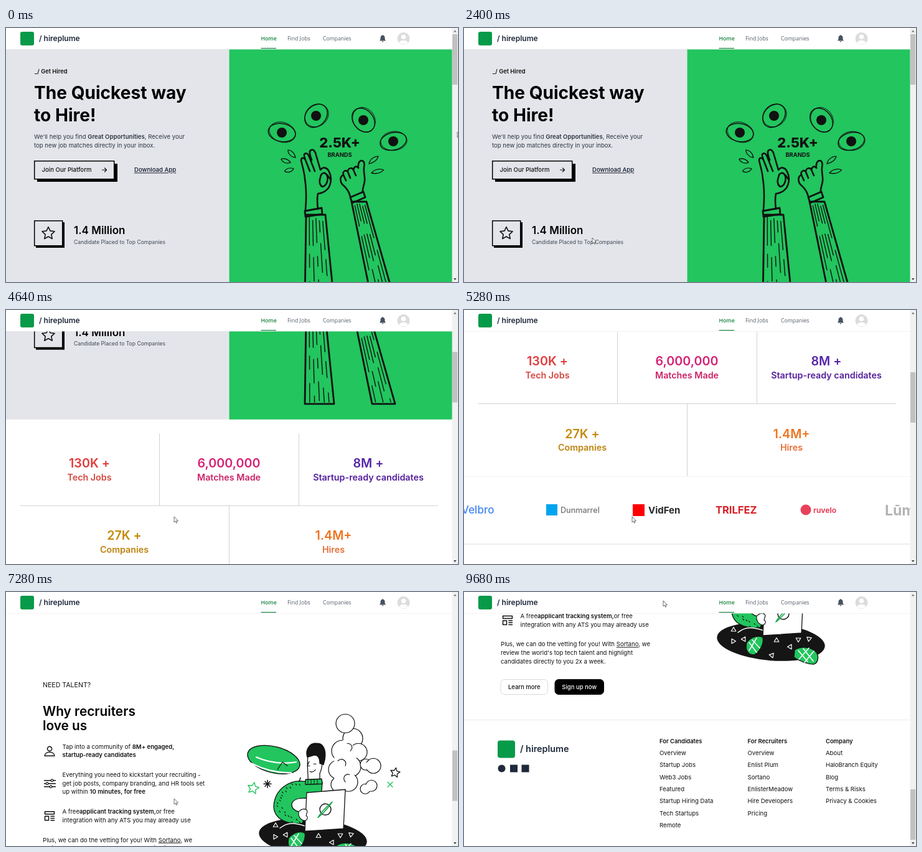
Write an HTML page that moves like this. It is 726x408 px and loops after 9.76 s.

```html
<!DOCTYPE html>
<html lang="en">
<head>
<meta charset="utf-8">
<title>hireplume</title>
<style>
html, body { margin: 0; width: 100%; height: 100%; overflow: hidden; background: #fff; }
svg { display: block; width: 726px; height: 408px; }
text { font-family: Inter, sans-serif; }
</style>
</head>
<body>
<svg id="stage" viewBox="0 0 726 408" xmlns="http://www.w3.org/2000/svg"></svg>
<script>
const LOOP = 9760, STEP = 80, GREEN = '#22c55e', BRAND = '#079a49', INK = '#111';

// ---------- drawing helpers ----------
// *bold* and _underlined_ runs are marked inside the string
const rich = s => s
  .replace(/\*(.+?)\*/g, '<tspan font-weight="600">$1</tspan>')
  .replace(/_(.+?)_/g, '<tspan text-decoration="underline">$1</tspan>');
const text = (x, y, size, s, fill = '#111', weight = 400, more = '') =>
  `<text x="${x}" y="${y}" font-size="${size}" fill="${fill}" font-weight="${weight}" ${more}>${rich(s)}</text>`;
const mid = (x, y, size, s, fill, weight) => text(x, y, size, s, fill, weight, 'text-anchor="middle"');
const lines = (x, y, list, fill) => list.map((s, i) => text(x, y + 3.4 + i * 13.6, 9.6, s, fill)).join('');
const rect = (x, y, w, h, fill, more = '') => `<rect x="${x}" y="${y}" width="${w}" height="${h}" fill="${fill}" ${more}/>`;
const circle = (x, y, r, fill, more = '') => `<circle cx="${x}" cy="${y}" r="${r}" fill="${fill}" ${more}/>`;
const oval = (x, y, rx, ry, a, fill, more = '') =>
  `<ellipse cx="${x}" cy="${y}" rx="${rx}" ry="${ry}" fill="${fill}" transform="rotate(${a} ${x} ${y})" ${more}/>`;
const line = (d, w = 1.2, color = INK, fill = 'none') =>
  `<path d="${d}" fill="${fill}" stroke="${color}" stroke-width="${w}" stroke-linecap="round" stroke-linejoin="round"/>`;
const shape = (d, fill, w = 1.3) => line(d, w, INK, fill);
const group = (y, s) => `<g transform="translate(0 ${y})">${s}</g>`;
const each = (list, fn) => list.map(fn).join('');

let seed = 7;
const rnd = () => (seed = (seed * 16807) % 2147483647) / 2147483647;

function star(x, y, R, w = 1.4, color = INK, turn = 0) {
  let d = '';
  for (let i = 0; i < 10; i++) {
    const a = (i * 36 - 90 + turn) * Math.PI / 180, r = i % 2 ? R * 0.48 : R;
    d += (i ? 'L' : 'M') + (x + r * Math.cos(a)).toFixed(1) + ' ' + (y + r * Math.sin(a)).toFixed(1);
  }
  return line(d + 'Z', w, color);
}
const cross = (x, y, r = 2, color = INK, w = 1) =>
  line(`M${x - r} ${y - r}l${2 * r} ${2 * r}M${x + r} ${y - r}l${-2 * r} ${2 * r}`, w, color);

// ---------- hero ----------
const bubble = (x, y, rx, ry, a) =>
  oval(x, y, rx, ry, a, 'none', 'stroke="#111" stroke-width="1.5"') +
  oval(x + 1, y - 0.6, rx - 0.4, ry + 1.3, a + 9, 'none', 'stroke="#111" stroke-width="0.9"') +
  circle(x, y, 8, INK);

const drop = (x, y, len, a) =>
  `<g transform="translate(${x} ${y}) rotate(${a})">${line(`M0 0C${len * .3} -5 ${len * .8} -4 ${len} 0C${len * .7} 4 ${len * .3} 3 0 0`, 1.3)}</g>`;

// a sleeve from (ax..bx, top) down to (cx..dx, bottom) with broken hatching
function sleeve(ax, bx, top, cx, dx, bottom) {
  const at = (u, v) => `${(ax + (bx - ax) * u + (cx - ax + (dx - cx - bx + ax) * u) * v).toFixed(1)} ${(top + (bottom - top) * v).toFixed(1)}`;
  let hatch = '';
  for (let k = 1; k < 6; k++) {
    for (let v = rnd() * 0.06 + 0.02; v < 0.95;) {
      const end = Math.min(0.98, v + 0.1 + rnd() * 0.25);
      hatch += `M${at(k / 6, v)}L${at(k / 6, end)}`;
      v = end + 0.06 + rnd() * 0.14;
    }
  }
  return line(`M${at(0, 0)}L${at(0, 1)}L${at(1, 1)}L${at(1, 0)}Z`, 2.8) + line(hatch, 1.4);
}

const hands =
  line('M481 292C483 270 482 255 480 242C479 230 476 222 474 213C474 207 479 208 481 212L488 230' +
    'M485 222C481 212 478 206 479 203C482 199 486 203 487 207L496 230' +
    'M491 212C488 204 486 198 490 196C494 194 497 199 498 204L505 228' +
    'C509 222 516 224 519 231C524 240 522 252 517 258C512 264 504 266 501 266C499 275 500 283 501 291' +
    'M505 240C506 232 513 230 516 238C518 246 514 254 508 255C503 252 503 245 505 240M516 236L521 243', 2.6) +
  line('M480 294L507 289L508 299L481 303Z', 2.8) + sleeve(482, 513, 300, 480, 527, 440) +
  line('M553 271C551 262 547 257 541 252C536 247 536 238 542 236C540 230 546 227 549 231C549 225 556 223 558 228' +
    'C559 222 564 221 566 225C565 219 567 213 571 213C576 213 576 219 575 224C574 232 577 238 576 246C575 254 572 258 573 264' +
    'M542 236L546 245M549 231L553 241M558 228L562 237', 2.6) +
  line('M553 272L574 263L577 272L556 281Z', 2.8) + sleeve(555, 579, 279, 588, 625, 440);

const hero =
  rect(0, 34, 358.5, 431, '#e4e5ea') + rect(358.5, 34, 358.5, 431, GREEN) +
  text(46, 73.4, 9.3, '_/ Get Hired'.replace('_', '&#95;'), INK, 600) +
  text(45, 114, 28.1, 'The Quickest way', '#000', 700) + text(45, 150, 28.1, 'to Hire!', '#000', 700) +
  lines(45, 174.6, ["We'll help you find *Great Opportunities*, Receive your", 'top new job matches directly in your inbox.'], '#2b3443') +
  rect(50, 218, 129, 29, '#000') + rect(45.7, 213.7, 128, 29, '#e4e5ea', 'stroke="#000" stroke-width="1.5"') +
  text(57.5, 231.4, 9.6, 'Join Our Platform', INK, 500) + line('M154.5 228H161.5M158.5 225L161.5 228L158.5 231', 1.2) +
  text(206, 231.4, 9.6, 'Download App', '#0f172a', 500, 'text-decoration="underline"') +
  rect(48, 312, 46, 41, '#000') + rect(45.7, 309.7, 45, 40, '#e4e5ea', 'stroke="#000" stroke-width="1.5"') + star(68, 330, 10.5, 1.6) +
  text(109, 331.3, 17, '1.4 Million', '#000', 600) +
  text(109, 346.6, 8.57, 'Candidate Placed to Top Companies', '#3d4654') +
  bubble(443, 168, 22, 14.5, 10) + bubble(498, 141, 20.5, 16, -48) + bubble(574, 148, 21, 16, 50) + bubble(622, 182, 21.5, 14, -14) +
  mid(536, 192, 22, '2.5K+', INK, 800) + mid(536, 206.8, 9.3, 'BRANDS', INK, 700) +
  drop(465, 208, 17, -135) + drop(457, 216, 16, -160) + drop(462, 226, 15, 165) +
  drop(583, 218, 19, -38) + drop(587, 233, 20, -14) + hands;

// ---------- figures and partner strip ----------
const stat = (x, y, num, label, color, tint) => mid(x, y, 19.7, num, color, 600) + mid(x, y + 20.8, 14.3, label, tint, 600);
const stats =
  stat(134, 542, '130K +', 'Tech Jobs', '#e23c3c', '#d5473f') +
  stat(358, 542, '6,000,000', 'Matches Made', '#d61f74', '#cb2268') +
  stat(582, 542, '8M +', 'Startup-ready candidates', '#5424a8', '#541f9b') +
  stat(190, 658.5, '27K +', 'Companies', '#c38a0a', '#bd840f') +
  stat(526, 658.5, '1.4M+', 'Hires', '#ee7420', '#e56e35') +
  line('M246.5 488V603M470.5 488V603M23 603.5H694M358.5 603V720', 1, '#d2d2d4') +
  line('M0 720.5H717', 1, '#f3f3f4') + line('M0 829H717', 1, '#dcdcde');

const partners = [
  text(0, 780, 17, 'Velbro', '#4285f4', 500),
  rect(0, 765, 18, 18, '#00a4ef') + text(23, 779, 12.6, 'Dunmarrel', '#737373', 500),
  rect(3, 765, 19, 19, '#f00') + text(28, 780, 15, 'VidFen', '#282828', 700),
  text(0, 780, 16.5, 'TRILFEZ', '#d81f26', 700),
  circle(9, 774, 8.5, '#e8425a') + text(21, 778.5, 12, 'ruvelo', '#e8425a', 700),
  text(0, 783, 23, 'Lūmera', '#b3b3b5', 700)
];
const strip = each(partners, s => `<g class="partner">${s}</g>`);

// ---------- job seeker section ----------
const fingers = (x, y, a) => {
  const d = 'M-3 9L-5 -3M-1 7L-2 -7M1.5 7L1.5 -7M3.5 8L5 -4M0 13L0 5';
  return `<g transform="translate(${x} ${y}) rotate(${a})">${line(d, 4.4)}${line(d, 2.2, '#fff')}</g>`;
};

const dancers =
  fingers(120, 113, 18) + fingers(159, 100, -4) + fingers(204, 114, -4) + fingers(271, 116, 4) +
  shape('M128 237C118 249 96 249 75 247L68 272C95 282 130 281 148 262C156 285 152 305 151 326L172 331C178 300 180 262 165 231Z', '#151515') +
  line('M160 240C170 265 169 295 166 322M120 256C108 261 95 261 84 259', 0.8, '#ddd') +
  shape('M74 250C66 246 58 250 55 262C52 275 54 282 60 283C66 276 72 270 71 262Z', GREEN) +
  shape('M152 328C158 332 165 331 171 332C178 336 181 340 179 344C170 346 158 342 153 338Z', GREEN) +
  line('M62 254L66 262M58 262L64 268M158 333L162 339M164 333L168 340', 0.8) +
  shape('M148 112L165 110C166 140 163 170 161 190L165 231L127 237C125 222 124 208 124 200C104 190 92 175 92 158C93 142 101 129 108 120L122 127C115 138 111 150 113 158C116 168 124 172 134 172C142 155 146 130 148 112Z', 'url(#shirt)') +
  line('M148 118L165 116M106 124L119 131M97 150L101 153M99 170L104 169M112 185L115 181M156 132L158 136M153 155L156 152M152 180L155 184M129 205L132 208M151 205L154 202M155 222L158 219', 1) +
  shape('M133 178L140 180L146 212L135 233L130 226C136 208 135 195 133 178Z', GREEN) +
  oval(126, 156, 11.5, 15, -10, '#fff', 'stroke="#111" stroke-width="1.3"') +
  shape('M113 151C111 140 117 136 123 138C128 133 135 136 134 142C127 146 121 145 117 147Z', '#151515') +
  shape('M117 160C121 163 124 156 129 157C133 158 136 157 138 155C141 167 137 176 129 176C122 175 117 168 117 160Z', '#151515') +
  oval(126, 163, 4, 2, -10, '#fff') + line('M119 151c2 -2 4 -2 5 0M128 150c2 -2 4 -2 5 0M126 151l2 5', 1) +
  shape('M214 230L252 234C258 265 258 300 257 336L234 337L236 270L224 335L202 332C204 300 206 260 214 230Z', 'url(#pants)') +
  line('M215 228L252 232M214 234L252 238M221 246L218 251M211 266L212 270M225 275L223 280M212 295L214 299M208 318L211 320M244 254L246 258M249 280L247 284M242 300L245 303M250 318L248 322', 1) +
  oval(206, 341, 15, 6.5, -8, '#151515') + oval(238, 345, 15, 8, -20, '#151515') +
  shape('M193 125L209 122C208 145 212 162 222 172L250 172C262 165 268 145 265 125L280 123C286 145 287 165 281 178C275 190 265 197 262 203L263 236L247 236L246 231L211 232L214 195C200 188 190 170 191 150Z', '#151515') +
  shape('M226 171L243 171L247 231L224 228Z', '#fff') + shape('M233 174L238 174L243 212L238 222L232 212Z', '#151515') +
  line('M196 132L209 129M265 132L280 130M276 145C279 160 276 172 268 181', 0.8, '#ddd') +
  oval(237, 155, 10.5, 15, -3, '#fff', 'stroke="#111" stroke-width="1.3"') +
  shape('M225 146C223 137 230 134 236 136C245 133 252 140 250 152C252 158 250 164 246 164L244 150C239 146 232 146 225 146Z', '#151515') +
  line('M231 152h3M239 152h3M236 153l-2 6l3 0M234 164c3 1 6 0 7 -3', 1) +
  line('M170 87L173 92M185 73L183 94M204 91L197 99M127 284C134 282 138 278 139 274M83 165C86 177 92 182 94 183M285 188C282 194 279 196 277 197M196 270C193 278 193 286 195 291', 1) +
  line('M70 158C85 162 92 148 84 140C77 136 74 146 81 149C91 150 86 131 80 126', 1.1) +
  line('M78 233C88 237 104 243 104 232C102 225 92 231 97 237C107 243 117 225 101 208', 1.1) +
  line('M297 184C282 205 288 226 293 238C297 250 290 258 284 254C280 250 284 246 290 250', 1.1) +
  each([[108, 102], [102, 115], [71, 146], [95, 217], [255, 138], [298, 237]], p => cross(p[0], p[1])) + line('M239 130h5M241.5 127.5v5', 1);

const button = (x, y, w, s, dark) =>
  rect(x, y, w, 24, dark ? '#000' : '#fff', `rx="6" stroke="${dark ? '#000' : '#d9dadd'}" stroke-width="1"`) +
  mid(x + w / 2, y + 15.4, 9.5, s, dark ? '#fff' : INK, 500);
const buttons = (x, y) => button(x, y, 75.5, 'Learn more') + button(x + 87, y, 78.5, 'Sign up now', true);
const intro = (x, y, label, a, b) =>
  text(x, y + 4, 10.6, label, INK) + text(x, y + 49.5, 20.8, a, '#000', 600) + text(x, y + 72.3, 20.8, b, '#000', 600);

const seekers = dancers +
  intro(394.5, 90, 'GOT TALENT?', 'Why job seekers', 'love us') +
  star(406, 196, 9.2) + lines(426.5, 189, ['Unique jobs at *startups* and *tech companies* you', "can't find anywhere else"]) +
  line('M404 238L414 242L409.5 244L408 249ZM408.5 244L413.5 249M401 232L402.5 235M407 232L406 235M398 237L401 239M398 245L401 243', 1.3) +
  lines(426.5, 234.5, ['Say goodbye to cover letters - your profile is all', "you need. *One click to apply* and you're done."]) +
  line('M398.5 287H413.5V300.5H398.5ZM398.5 290H413.5M401 293.5H402M404 293.5H411M401 297H402M404 297H411', 1.3) +
  lines(426.5, 280, ['Everything you need to know to job search -', 'including seeing *salary* and *stock options* upfront', 'when looking']) +
  line('M397.5 346H404.5M400 341L404.5 346L400 351M414.5 346H407.5M412 341L407.5 346L412 351', 1.3) +
  lines(426.5, 339, ['Connect directly with *founders* at top startups - no', 'third party recruiters allowed']) +
  buttons(394.5, 382);

// ---------- recruiter section ----------
const puff = (x, y, r) => circle(x, y, r, '#fff', 'stroke="#111" stroke-width="1.2"');
const triangles = [[433, 139, 0], [450, 154, 30], [433, 158, 90], [502, 156, 0], [523, 167, -90], [537, 156, 180], [554, 155, 190], [568, 145, -90], [495, 180, 40]];
let dots = '';
for (let i = 0; i < 22; i++) {
  const a = (95 + i * 8.5) * Math.PI / 180, r = 0.72 + rnd() * 0.2;
  dots += `M${(474 + 44 * r * Math.cos(a)).toFixed(1)} ${(103 - 36 * r * Math.sin(a)).toFixed(1)}l1.5 1.5`;
}

const thinker =
  oval(430, 34, 43, 21, 14, GREEN, 'stroke="#111" stroke-width="1.4"') +
  line('M394 40C410 48 432 56 458 55M402 30C420 38 440 42 466 38', 2.2, '#fff') + line('M436 50l8 -12l8 6', 1.2) +
  each([[540, 20, 17], [557, 0, 16], [545, -24, 15], [566, 22, 14], [553, 45, 17], [533, 50, 15], [550, 70, 15], [534, 74, 12]], p => puff(...p)) +
  oval(545, 38, 18, 36, 0, '#fff') + oval(542, 66, 15, 18, 0, '#fff') +
  line('M533 36C540 30 548 36 545 44M552 58C544 56 540 64 545 70M548 8C556 8 558 16 553 20', 1.1) +
  puff(578, 42, 9) + puff(590, 44, 12) + oval(585, 44, 9, 7, 0, '#fff') + puff(577, 81, 8) + puff(587, 76, 9) + oval(582, 79, 7, 6, 0, '#fff') +
  oval(493, 159, 87, 30, 5, '#151515') +
  each(triangles, ([x, y, a]) => `<g transform="translate(${x} ${y}) rotate(${a})">${line('M0 -3.5L3.8 3H-3.8Z', 1.2, '#fff')}</g>`) +
  shape('M480 69C455 65 432 82 430 108C430 130 452 139 476 136L483 118C468 120 458 114 459 105C461 98 470 95 482 96L506 100L508 70Z', GREEN) + line(dots, 1.2) +
  line('M440 144C455 132 468 137 482 141', 1.5, '#fff') +
  shape('M486 20C482 40 486 58 485 68L504 68L504 56C510 44 508 26 504 18Z', '#fff') +
  shape('M484 30C480 18 488 6 500 8C512 8 516 24 510 42L504 40C504 30 500 26 494 27Z', '#151515') +
  line('M487 37l-3 7l4 0M488 53c4 2 7 0 9 -3M494 41h4', 1.2) +
  shape('M481 66L507 65L508 73L481 74Z', GREEN) + line('M485 66v7M490 66v7M495 66v7M500 66v7', 0.9) +
  shape('M454 160C462 150 474 148 480 152C482 162 476 174 466 180C456 180 451 172 454 160Z', GREEN) + line('M458 160L470 176M463 156L475 169M470 153L458 173', 1.6, '#fff') +
  shape('M531 172C542 165 558 167 566 176C571 184 568 193 562 195C550 195 538 189 530 184Z', GREEN) + line('M537 173L552 191M545 170L561 190M554 169L538 187M562 174L547 192', 1.6, '#fff') +
  shape('M483 87L545 82L542 145L480 149Z', '#fff') + shape('M470 118C475 112 482 112 484 117L482 124C486 126 484 132 479 132C472 130 469 124 470 118Z', '#fff', 1.1) +
  circle(513, 114, 9, 'none', 'stroke="#111" stroke-width="1.4"') + line('M501 127C510 120 518 111 524 102C518 107 506 118 501 127', 1.6, '#16a34a') +
  star(397, 80, 9.5, 1.4, GREEN, 12) + star(625, 55, 8, 1.3, INK, 10) + cross(617, 74, 4, GREEN, 1.4) +
  cross(420, 73, 4, INK, 1.5) + line('M420 67V79M414 73H426M473 63L471 69', 1.5);

const recruiters = thinker +
  intro(59, -86, 'NEED TALENT?', 'Why recruiters', 'love us') +
  line('M62 28C62 20 78 20 78 28ZM70 13a3.6 3.6 0 1 0 .1 0', 1.4) +
  lines(90.5, 13, ['Tap into a community of *8M+ engaged,*', '*startup-ready candidates*']) +
  line('M61.5 67.5H72M76 67.5H79.5M61.5 72.5H64M68 72.5H79.5M61.5 77.5H70M74 77.5H79.5', 1.4) +
  each([[74, 67.5], [66, 72.5], [72, 77.5]], p => circle(p[0], p[1], 1.8, '#fff', 'stroke="#111" stroke-width="1.2"')) +
  lines(90.5, 58.5, ['Everything you need to kickstart your recruiting -', 'get job posts, company branding, and HR tools set', 'up within *10 minutes, for free*']) +
  line('M62.5 117.5H77.5V121.5H62.5ZM62.5 125H68.5V131.5H62.5ZM72 125H77.5M72 128.3H77.5M72 131.5H77.5', 1.5) +
  lines(90.5, 117.8, ['A free*applicant tracking system,*or free', 'integration with any ATS you may already use']) +
  lines(59, 163, ['Plus, we can do the vetting for you! With _Sortano_, we', "review the world's top tech talent and highlight", 'candidates directly to you 2x a week.']) +
  buttons(59, 219.5) + line('M0 284.5H717', 1, '#ececee');

// ---------- footer ----------
const columns = [
  [314, 'For Candidates', 'Overview', 'Startup Jobs', 'Web3 Jobs', 'Featured', 'Startup Hiring Data', 'Tech Startups', 'Remote'],
  [455.5, 'For Recruiters', 'Overview', 'Enlist Plum', 'Sortano', 'EnlisterMeadow', 'Hire Developers', 'Pricing'],
  [581, 'Company', 'About', 'HaloBranch Equity', 'Blog', 'Terms &amp; Risks', 'Privacy &amp; Cookies']
];
const footer =
  rect(54, 238.5, 28, 28, BRAND, 'rx="4"') + text(90, 257, 14.4, '/ hireplume', '#1e293b', 600) +
  circle(60.5, 283.5, 6, '#1e293b') + rect(74, 277.5, 12, 12, '#1e293b') + rect(92.5, 277.5, 12, 12, '#1e293b') +
  each(columns, ([x, ...rows]) => each(rows, (s, i) =>
    text(x, 242.7 + i * 19.3, i ? 9.6 : 9.4, s, INK, i ? 400 : 600)));

// ---------- fixed parts ----------
const nav = (x, s, color, weight) => text(x, 20, 8.7, s, color, weight, 'style="font-family:\'Open Sans\',sans-serif"');
const header =
  rect(0, 0, 717, 34, '#fff') + line('M0 34.3H717', 0.6, '#e8e8ea') +
  rect(23, 6, 22, 22, BRAND, 'rx="3"') + text(53, 21.2, 12, '/ hireplume', '#1e293b', 600) +
  nav(409.5, 'Home', '#15803d', 600) + nav(452, 'Find Jobs', '#555e6b', 400) + nav(509, 'Companies', '#555e6b', 400) +
  rect(409.5, 32, 24.5, 1.2, '#15803d') +
  '<path d="M600 20.5C601.500 19 601.500 17.500 601.500 15.500C601.500 13.300 603 12 604.300 11.700C604.300 10.800 605.700 10.800 605.700 11.700C607 12 608.500 13.300 608.500 15.500C608.500 17.500 608.500 19 610 20.500ZM603.600 21.300H606.400C606.200 23 603.800 23 603.600 21.300Z" fill="#475160"/>' +
  circle(638.5, 17, 10, '#dcdcdd') + circle(638.5, 14.2, 3.8, '#fff') + '<path d="M631.500 23.500C633 18.500 644 18.500 645.500 23.500C642 27.300 635 27.300 631.500 23.500Z" fill="#fff"/>';
const bar =
  rect(716.5, 0, 9.5, 408, '#f1f1f1') + rect(717, 10, 8, 81, '#c1c1c1', 'id="thumb"') +
  '<path d="M718.800 6.500L721.200 3.500L723.600 6.500Z" fill="#777"/><path d="M718.800 402L721.200 405L723.600 402Z" fill="#444"/>';
const arrow = '<path id="cursor" d="M0 0V9L2.100 7.200L3.500 10.300L4.900 9.700L3.600 6.700H6.500Z" fill="#fff" stroke="#333" stroke-width="0.7"/>';

const stage = document.getElementById('stage');
stage.innerHTML =
  `<defs><linearGradient id="shirt"><stop offset="0" stop-color="#dcdcdc"/><stop offset=".45" stop-color="#fff"/></linearGradient>
  <linearGradient id="pants" x2="0" y2="1"><stop offset="0" stop-color="#34d56c"/><stop offset="1" stop-color="#1fae52"/></linearGradient></defs>` +
  rect(0, 0, 726, 408, '#fff') +
  `<g id="page">${hero}${stats}${strip}${group(846, seekers)}${group(1466, recruiters)}${group(1545, footer)}</g>` +
  header + bar + arrow;

// ---------- motion ----------
const scrollKeys = [[0, 0], [3160, 0], [3920, 134], [5280, 453], [6400, 846], [8000, 1466], [8720, 1545], [LOOP, 1545]];
const cursorKeys = [[0, 725, 167], [1760, 206, 337], [2480, 206, 337], [3120, 270, 332], [9360, 270, 332], [9640, 320, 14], [LOOP, 320, 14]];

const find = (keys, t) => {
  let i = 0;
  while (i < keys.length - 2 && t >= keys[i + 1][0]) i++;
  return i;
};

// monotone cubic through the scroll keys
const rate = i => (scrollKeys[i + 1][1] - scrollKeys[i][1]) / (scrollKeys[i + 1][0] - scrollKeys[i][0]);
const slope = i => {
  if (i === 0 || i === scrollKeys.length - 1) return 0;
  const a = rate(i - 1), b = rate(i);
  return a * b > 0 ? 2 * a * b / (a + b) : 0;
};
function scrollAt(t) {
  const i = find(scrollKeys, t), [t0, a] = scrollKeys[i], [t1, b] = scrollKeys[i + 1];
  const h = t1 - t0, u = (t - t0) / h, v = 1 - u;
  return a * (1 + 2 * u) * v * v + slope(i) * h * u * v * v + b * u * u * (3 - 2 * u) - slope(i + 1) * h * u * u * v;
}
function cursorAt(t) {
  const i = find(cursorKeys, t), [t0, x0, y0] = cursorKeys[i], [t1, x1, y1] = cursorKeys[i + 1];
  const u = (t - t0) / (t1 - t0), e = u * u * (3 - 2 * u);
  return [x0 + (x1 - x0) * e, y0 + (y1 - y0) * e];
}

const page = document.getElementById('page'), thumb = document.getElementById('thumb');
const cursor = document.getElementById('cursor'), logos = [...document.querySelectorAll('.partner')];
const SLOT = 136, ROW = SLOT * partners.length;

function draw(t) {
  const y = scrollAt(t), [cx, cy] = cursorAt(t);
  page.setAttribute('transform', `translate(0 ${-y.toFixed(2)})`);
  thumb.setAttribute('y', (10 + y * 0.1987).toFixed(2));
  cursor.setAttribute('transform', `translate(${cx.toFixed(2)} ${cy.toFixed(2)})`);
  const shift = (t - 5280) * 0.019;
  logos.forEach((el, i) => {
    const x = ((i * SLOT - 4 - shift + SLOT) % ROW + ROW) % ROW - SLOT;
    el.setAttribute('transform', `translate(${x.toFixed(2)} 0)`);
  });
}

const start = performance.now();
function tick() {
  const t = (performance.now() - start) % LOOP;
  draw(Math.floor(t / STEP) * STEP);
  requestAnimationFrame(tick);
}
draw(0);
requestAnimationFrame(tick);
</script>
</body>
</html>
```
